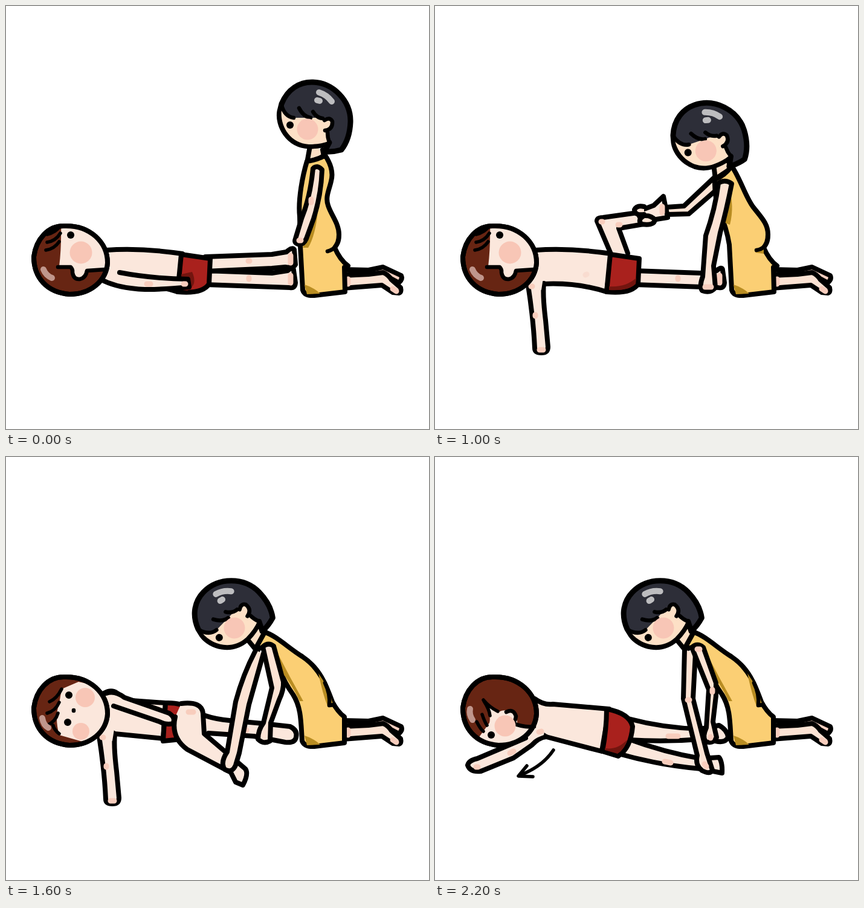
An HTML page for the animation above (3.2 s loop, 700 by 700 pixels).

```html
<!DOCTYPE html>
<html lang="en">
<head>
<meta charset="utf-8">
<title>Rolling over</title>
<style>
html, body { margin: 0; width: 100%; height: 100%; overflow: hidden; background: #fff; }
svg { display: block; width: 100%; height: 100%; }
path, ellipse { stroke: #000; stroke-width: 8; stroke-linecap: round; stroke-linejoin: round; }
.skin { fill: #fbe7dc; }
.her { fill: #fde0c6; }
.limb { fill: #fce3d4; }
.red { fill: #a9211d; }
.maroon { fill: #73150f; stroke: none; }
.dress { fill: #fbcf74; }
.shade { fill: #b98d22; stroke: none; }
.brown { fill: #672513; }
.ink { fill: #2d2e38; stroke-width: 9; }
.line { fill: none; stroke-width: 6.5; }
.lock { fill: none; stroke-width: 5.5; }
.bare { stroke: none; }
.spot { fill: none; stroke: #f8cdbd; stroke-width: 9; }
.blush { fill: #f8c6b6; stroke: none; }
.eye { fill: none; stroke-width: 12; }
.arrow { fill: none; stroke-width: 5.5; }
.shine { fill: none; stroke: #bdbdbf; stroke-width: 10; }
.gloss { fill: none; stroke: #c0968c; stroke-width: 10; }

/* Each pose is shown for one 200 ms step; the last one holds. */
.pose { visibility: hidden; animation: step 3.2s calc((var(--t) - 3200) * 1ms) step-end infinite; }
.hold { animation-name: hold; }
@keyframes step { 0% { visibility: visible } 6.25%, 100% { visibility: hidden } }
@keyframes hold { 0% { visibility: visible } 31.25%, 100% { visibility: hidden } }
</style>
</head>
<body>
<svg viewBox="0 0 700 700">
<defs>
  <!-- Man: heads -->
  <path id="skull" d="M95 364C140 362 168 392 168 425C166 455 140 477 105 477C68 474 46 450 46 415C50 385 70 364 95 364Z"/>
  <clipPath id="inHead"><use href="#skull"/></clipPath>
  <path id="bangs" class="lock" d="M89 365Q82 375 68 378M90 376Q82 389 68 391M88 390Q80 402 66 404"/>
  <g id="headSide">
    <use href="#skull" class="brown"/>
    <path class="skin bare" clip-path="url(#inHead)" d="M91 355H180V435H137Q134 453 120 452Q108 450 108 432L88 431Q92 400 91 355Z"/>
    <use href="#bangs"/>
    <path class="line" d="M86 432H107Q111 436 110 441Q112 453 122 452Q132 450 134 438L164 436"/>
    <path class="gloss" d="M62 436Q66 446 76 450"/>
    <circle class="blush" cx="124" cy="408" r="18.5"/>
    <path class="eye" d="M107 379h.1"/>
    <use href="#skull" fill="none"/>
  </g>
  <g id="headTurned">
    <use href="#skull" class="brown"/>
    <path class="skin bare" clip-path="url(#inHead)" d="M91 355H180V455L132 461Q112 464 106 452L80 445Q82 420 88 405Q92 390 91 355Z"/>
    <use href="#bangs"/>
    <path class="lock" d="M87 402Q80 414 66 418M84 417Q78 428 66 432M82 432Q78 442 67 448"/>
    <path class="line" d="M80 446Q100 449 105 457Q113 466 130 459"/>
    <path class="gloss" d="M61 437L64 441"/>
    <circle class="blush" cx="122" cy="434" r="19.5"/>
    <ellipse class="blush" cx="125" cy="375" rx="9" ry="5"/>
    <path class="eye" d="M106 371h.1M104 408h.1"/>
    <path class="line" d="M113 386h2"/>
    <use href="#skull" fill="none"/>
  </g>
  <g id="headFront">
    <use href="#skull" class="brown"/>
    <path class="skin bare" clip-path="url(#inHead)" d="M88 460Q80 430 88 408L92 384L120 372L180 385V470L130 472Z"/>
    <path class="lock" d="M92 384Q84 400 72 405M88 406Q82 420 68 424M86 424Q82 438 68 444M88 458Q80 452 78 444"/>
    <path class="gloss" d="M60 432Q62 444 70 448"/>
    <circle class="blush" cx="131" cy="398" r="16"/>
    <circle class="blush" cx="124" cy="454" r="14"/>
    <path class="eye" d="M104 394h.1M102 439h.1"/>
    <path class="line" d="M112 419v1"/>
    <use href="#skull" fill="none"/>
  </g>
  <g id="headDown">
    <use href="#skull" class="brown"/>
    <path class="skin bare" clip-path="url(#inHead)" d="M84 485Q92 450 87 428L92 406L112 396Q118 382 131 389Q134 395 134 399L180 402V485Z"/>
    <path class="lock" d="M78 388Q83 400 90 407M73 404Q80 414 82 424M68 418Q80 430 84 440M64 432Q72 446 82 450"/>
    <path class="line" d="M92 406Q104 396 111 396Q117 382 130 389Q134 396 133 399Q148 394 162 402"/>
    <path class="gloss" d="M60 436Q62 446 70 451"/>
    <circle class="blush" cx="135" cy="412" r="19.5"/>
    <ellipse class="blush" cx="121" cy="467" rx="12" ry="5"/>
    <path class="eye" d="M105 417h.1M101 468h.1"/>
    <path class="line" d="M107 451h4"/>
    <use href="#skull" fill="none"/>
  </g>
  <g id="headProne">
    <use href="#skull" class="brown"/>
    <path class="skin bare" clip-path="url(#inHead)" d="M80 402L105 422Q116 416 130 422Q137 434 136 441L170 449V490H62L74 462L90 440Q94 425 80 402Z"/>
    <path class="lock" d="M80 402Q90 414 104 421M81 404Q90 418 91 428M78 426Q82 438 86 444M69 438Q75 450 80 454"/>
    <path class="line" d="M118 422Q130 416 134 429Q133 438 128 440Q146 448 164 446"/>
    <path class="gloss" d="M58 417Q56 426 62 435"/>
    <circle class="blush" cx="116" cy="445" r="17.5"/>
    <path class="eye" d="M93 460h.1"/>
    <use href="#skull" fill="none"/>
  </g>

  <!-- Man: body -->
  <path id="torso" class="skin" d="M150 440L166 404Q225 400 292 410L284 473Q235 457 178 460L150 440"/>
  <g id="standArm">
    <path class="skin" d="M180 459Q178 480 183 520L187 564Q187 574 176 574Q165 574 165 566Q163 520 154 462L140 440"/>
    <path class="skin bare" d="M140 425H183L176 470L158 468Z"/>
    <path class="spot" d="M166 511v2M159 464h2M173 569h6"/>
  </g>
  <path id="shorts" class="red" d="M290 411L338 418L336 460Q325 477 284 473Z"/>
  <path id="shortsHem" class="maroon" d="M288 464Q315 466 333 450L332 460Q320 472 288 470Z"/>
  <g id="lowLeg">
    <path class="skin" d="M330 438L440 442L466 438Q475 430 476 437L479 458Q478 468 470 466L330 461"/>
    <path class="spot" d="M402 450v2M471 446v12"/>
  </g>
  <g id="bothLegs">
    <use href="#lowLeg"/>
    <path class="skin" d="M330 415L440 411L464 407Q474 398 477 403L479 428Q476 434 462 432L440 434L330 439"/>
    <path class="spot" d="M401 422h2M471 413v12"/>
  </g>
  <g id="trunk"><use href="#torso"/><use href="#standArm"/><path class="spot" d="M249 445l2-1" opacity=".4"/></g>
  <g id="crossTrunk">
    <path class="skin" d="M150 440L162 391Q180 380 194 402L264 407L260 466L180 458L150 440"/>
    <use href="#standArm"/>
    <path class="red" d="M264 407Q290 406 304 417L290 467L260 470Z"/>
  </g>
  <path id="restLeg" class="skin" d="M298 412Q325 432 370 436L425 441L470 446Q483 452 480 464Q478 474 462 472L410 462L335 457"/>
  <g id="proneBody">
    <path class="skin" d="M320 433Q380 449 440 450L470 444Q484 452 485 464Q480 474 464 470L440 467Q380 472 320 468"/>
    <path class="skin" d="M318 466Q380 489 440 499L470 497Q476 505 475 523L440 516Q370 510 300 490"/>
    <path class="spot" d="M386 462h16M380 504l10 2"/>
    <path class="skin" d="M150 440L165 400Q180 411 195 409L288 417L276 487L184 463L150 440"/>
    <path class="red" d="M284 417Q322 424 327 446Q324 482 303 495L277 487Q284 450 284 417Z"/>
    <path class="maroon" d="M281 482Q302 485 318 468Q313 484 302 491L281 485Z"/>
  </g>

  <!-- Woman -->
  <g id="shins">
    <path fill="#f6cfc0" d="M558 436L600 437L624 432L654 446Q657 452 650 458L624 444H558"/>
    <path class="limb" d="M558 446L600 444L624 441Q632 444 638 453L653 466Q655 474 650 475L640 474L622 462L558 467"/>
    <path class="spot" d="M566 452v8M640 468l6 4"/>
  </g>
  <path id="hem" class="shade" d="M494 461Q510 466 520 476L498 477Z"/>
  <g id="herHead">
    <path class="ink" d="M-55-20C-45-45-25-56-5-56C30-56 60-25 59 10Q58 38 44 56Q30 60 16 59L24 44Q10 50-10 50C-45 48-62 15-58-8Z"/>
    <path class="her bare" d="M-55-16Q-48 0-36 3H16Q27 1 28 12Q28 24 18 25L22 42Q10 47-10 47C-42 45-58 15-55-10Z"/>
    <path class="line" d="M-55-18Q-50 1-35 3M-26-13Q-19 1-7 3M-3-7Q3 3 13 4M16 7Q25 1 29 9Q30 22 17 24M24 44Q21 36 21 27"/>
    <path class="shine" d="M7-39Q20-35 28-24M4-26l4 1"/>
    <circle class="blush" cx="-12" cy="22" r="17.5"/>
    <path class="eye" d="M-41 15h.1"/>
  </g>
  <g id="upright">
    <use href="#shins"/>
    <path class="her" d="M503 232L498 260H528L524 238"/>
    <path class="dress" d="M498 257Q515 255 528 247C538 262 542 276 538 290C535 304 528 316 533 330C538 346 551 360 551 378C551 390 548 394 544 400C550 414 558 424 566 430L560 432L561 473L510 479Q494 480 491 470L487 397L486 348C483 320 491 280 498 257Z"/>
    <path class="shade" d="M491 400L516 340Q512 380 500 400Z"/>
    <use href="#hem"/>
    <path class="line" d="M551 384Q548 402 532 406"/>
    <use href="#herHead" x="511" y="182"/>
    <path class="limb" d="M508 269Q515 262 523 271C522 300 516 330 509 352L497 385Q492 396 483 394Q476 392 479 385L489 352C500 325 505 300 508 269Z"/>
    <path class="spot" d="M505 320v5M485 388h3"/>
  </g>
  <path id="bentNeck" class="her" d="M479 262V285L506 275L502 258"/>
  <g id="bentNear">
    <path class="dress" d="M478 283Q494 282 509 268C520 285 524 314 533 332C541 348 551 360 551 378C551 390 548 394 544 400C550 414 558 424 566 430L560 432L561 473L510 479Q494 480 491 470L488 397L487 335Q477 310 478 283Z"/>
    <path class="shade" d="M510 298Q522 330 515 355L492 402L502 350Z"/>
    <use href="#hem"/>
    <path class="line" d="M551 384Q548 402 532 406"/>
    <use href="#herHead" transform="translate(470.5 214.5)rotate(-19)"/>
    <path class="limb" d="M492 291Q502 283 513 291Q512 340 500 372L472 430L464 464Q454 472 444 466Q442 456 447 446L456 430L483 365Q491 335 492 291Z"/>
  </g>
  <path id="leanNeck" class="her" d="M461 262L464 286L491 268L485 256"/>
  <g id="leanNear">
    <path class="dress" d="M463 287Q478 282 491 265C505 285 513 314 526 332C540 350 551 360 551 378C551 390 548 394 544 400C550 414 558 424 566 430L560 432L561 473L510 479Q494 480 491 470L487 395Q482 365 472 345Q462 318 463 287Z"/>
    <path class="shade" d="M486 300Q496 330 488 362L478 358Z"/>
    <path class="shade" d="M530 408L544 398L544 410Z"/>
    <use href="#hem"/>
    <path class="line" d="M551 384Q548 402 532 404"/>
    <use href="#herHead" transform="translate(452.5 215)rotate(-19)"/>
    <path class="limb" d="M469 293Q480 286 491 294Q482 340 472 375L461 430L464 466Q456 476 442 471Q437 464 443 448L448 380Q464 335 469 293Z"/>
    <path class="spot" d="M447 465h10"/>
  </g>
  <g id="crouch">
    <path class="dress" d="M437 293L457 270C470 280 480 298 495 312C525 338 548 352 549 378C549 392 546 396 542 402C550 414 558 424 566 430L560 432L561 473L510 479Q494 480 490 470L487 400Q484 380 465 350Z"/>
    <path class="shade" d="M467 302Q482 335 477 360L464 346Z"/>
    <path class="shade" d="M528 408L542 400L546 411Z"/>
    <use href="#hem"/>
    <path class="line" d="M549 382Q546 402 532 404"/>
    <use href="#herHead" transform="translate(406.5 232)rotate(-36)"/>
    <path class="limb" d="M448 297Q458 289 467 299L463 365L440 440L439 471Q430 480 420 472Q418 460 426 447L444 380Z"/>
    <path class="spot" d="M424 467h9"/>
  </g>
  <path id="stoopNeck" class="her" d="M402 305L416 322L430 290L418 278"/>
  <g id="stoop">
    <path class="dress" d="M413 317L428 290C445 294 470 318 490 330C520 350 530 378 540 405Q549 422 560 430V473L510 479Q494 480 490 470C488 440 489 415 475 393Q460 372 454 354L436 314Z"/>
    <path class="shade" d="M449 324Q470 365 492 404L486 404Q472 374 456 356Z"/>
    <path class="shade" d="M517 358Q524 392 532 412L541 408Q532 378 517 358Z"/>
    <use href="#hem"/>
    <path class="line" d="M528 374Q537 392 535 411L543 410"/>
    <use href="#herHead" transform="translate(370.5 259)rotate(-46)"/>
  </g>
  <path id="stoopArm" class="limb" d="M425 314Q434 306 443 313L459 372Q460 385 452 402L438 440L437 470Q426 476 417 467Q417 452 426 440L440 382Z"/>
  <g id="finalWoman">
    <use href="#shins"/><use href="#stoopNeck"/>
    <path class="limb" d="M413 318L411 400L434 494Q430 510 442 519Q456 526 459 518L450 490L427 400L431 325"/>
    <path class="spot" d="M418 402h3M446 508l3 4"/>
    <use href="#stoop"/>
    <path class="limb" d="M425 315Q434 307 444 315L465 374L465 395L460 438L466 464Q460 475 448 471Q442 464 449 448L453 385Z"/>
    <path class="spot" d="M434 318h4M459 385v4M456 463v2"/>
  </g>
</defs>

<g class="pose" style="--t:0">
  <use href="#bothLegs"/><use href="#torso"/><use href="#shorts"/>
  <path class="maroon" d="M290 444L308 440Q318 462 300 471L292 470Z"/>
  <path class="skin bare" d="M155 440H190L288 451L300 466L215 468L160 455Z"/>
  <path class="skin" d="M188 441Q240 451 301 452L303 465Q240 471 215 468Q180 465 156 452"/>
  <path class="spot" d="M233 460h6M294 460h3"/>
  <use href="#headSide"/><use href="#upright"/>
</g>

<g class="pose" style="--t:200">
  <use href="#bothLegs"/><use href="#torso"/><use href="#shorts"/><use href="#shortsHem"/>
  <path class="skin" d="M192 438L284 515Q290 526 282 533Q274 538 266 531L155 456"/>
  <path class="spot" d="M226 488l4 3M274 525l3 2"/>
  <use href="#headSide"/><use href="#upright"/>
</g>

<g class="pose" style="--t:400">
  <use href="#bothLegs"/><use href="#trunk"/><use href="#shorts"/><use href="#shortsHem"/>
  <use href="#headSide"/><use href="#upright"/>
</g>

<g class="pose" style="--t:600">
  <use href="#lowLeg"/><use href="#trunk"/>
  <path class="skin" d="M308 405L352 368Q358 365 370 367L436 371L464 359Q470 374 462 386L440 393L380 391L325 424"/>
  <path class="spot" d="M354 374l6-1M459 370v8"/>
  <path class="red" d="M290 411L317 398L338 430L336 460Q325 477 284 473Z"/>
  <use href="#shortsHem"/><use href="#headSide"/>
  <use href="#shins"/><use href="#bentNeck"/>
  <path class="limb" d="M484 327L444 360Q430 366 430 378Q434 386 440 380L487 346"/>
  <ellipse class="limb" cx="441" cy="391" rx="9" ry="6"/>
  <use href="#bentNear"/>
</g>

<g class="pose" style="--t:800">
  <use href="#lowLeg"/><use href="#trunk"/>
  <path class="skin" d="M293 410L304 358Q308 349 320 350L396 350L418 333Q426 350 424 368L396 374L344 378L328 416"/>
  <path class="spot" d="M312 358h5M418 348v10"/>
  <use href="#shorts"/><use href="#shortsHem"/><use href="#headSide"/>
  <use href="#shins"/><use href="#bentNeck"/>
  <path class="limb" d="M484 325L440 351L396 349Q384 354 388 364Q394 368 402 362L444 368L487 346"/>
  <ellipse class="limb" cx="402" cy="371" rx="10" ry="7"/>
  <use href="#bentNear"/>
</g>

<g class="pose" style="--t:1000">
  <use href="#lowLeg"/><use href="#trunk"/>
  <path class="skin" d="M291 410L268 356Q268 350 278 350L335 342L345 361L304 368L319 409"/>
  <path class="spot" d="M275 357h2M303 362h3"/>
  <use href="#shorts"/><use href="#shortsHem"/><use href="#headSide"/>
  <use href="#shins"/><use href="#leanNeck"/>
  <path class="limb" d="M464 282L412 331L382 333L384 345L420 344L466 304"/>
  <path class="skin" d="M338 339L362 330L378 315L381 330L385 350L360 354"/>
  <path class="limb" d="M346 345Q330 347 330 337Q334 329 346 332M346 347Q334 354 342 361Q362 364 364 354Q358 346 346 347"/>
  <path class="spot" d="M376 332v10"/>
  <use href="#leanNear"/>
</g>

<g class="pose" style="--t:1200">
  <use href="#lowLeg"/><use href="#trunk"/>
  <path class="skin" d="M290 412L238 372Q230 362 242 354L314 334L326 352L278 368L319 408"/>
  <path class="spot" d="M244 364h4"/>
  <use href="#shorts"/><use href="#shortsHem"/><use href="#headSide"/>
  <use href="#shins"/><use href="#leanNeck"/>
  <path class="limb" d="M464 282L404 326L362 329V342L412 342L466 304"/>
  <path class="skin" d="M318 334L342 325L357 310L360 326L364 345L340 349"/>
  <path class="limb" d="M326 340Q310 342 310 332Q314 324 326 327M326 342Q314 349 322 356Q342 359 344 349Q338 341 326 342"/>
  <use href="#leanNear"/>
</g>

<g class="pose" style="--t:1400">
  <path class="skin" d="M310 428L370 438L425 443L470 448Q482 452 480 464Q478 474 464 471L410 466L310 460"/>
  <path class="spot" d="M390 455h8M464 462h4"/>
  <use href="#standArm"/>
  <path class="skin bare" d="M150 392L185 403L272 404L285 470L178 459L150 450Z"/>
  <path fill="none" d="M184 403L270 404M180 459Q235 460 285 471"/>
  <path class="skin" d="M160 394L250 354L274 342Q286 342 284 353Q278 362 260 368L184 403"/>
  <path class="spot" d="M231 380l5-2M268 353l6-2"/>
  <path fill="#73150f" d="M300 447L318 432L320 456L306 458Z"/>
  <path class="skin" d="M270 404C284 386 322 386 322 410Q320 434 297 449L346 482L377 506Q380 512 369 525L360 521L352 506L284 470C260 463 258 425 270 404Z"/>
  <path fill="none" d="M297 449Q282 446 274 436"/>
  <path class="spot" d="M314 412Q312 426 302 436M367 510l2 3"/>
  <path class="arrow" d="M296 364Q276 370 262 391M261 378L260 395L276 391"/>
  <use href="#headTurned"/>
  <use href="#shins"/>
  <path class="her" d="M431 284L438 296L458 272L450 262"/>
  <path class="limb" d="M437 297L392 385L340 480Q328 490 331 502Q344 512 352 501L358 480L414 386L444 312"/>
  <path class="spot" d="M403 390l3 2M340 500h4"/>
  <use href="#crouch"/>
</g>

<g class="pose" style="--t:1600">
  <use href="#restLeg"/><use href="#crossTrunk"/>
  <path class="skin" d="M290 408Q324 404 326 424L328 458L396 516Q402 524 392 543L380 538L372 522L300 484Q272 464 280 430"/>
  <path class="spot" d="M390 452h8M302 422h8"/>
  <path class="skin" d="M166 391Q180 386 196 398L270 424Q282 432 276 441Q266 444 254 438L178 412"/>
  <use href="#headFront"/>
  <use href="#shins"/><use href="#stoopNeck"/>
  <path class="limb" d="M413 320Q392 360 380 405L366 488Q354 506 362 517Q374 524 380 510L386 490L402 410L426 325"/>
  <use href="#stoop"/><use href="#stoopArm"/>
</g>

<g class="pose" style="--t:1800">
  <use href="#restLeg"/><use href="#crossTrunk"/>
  <path class="skin" d="M300 420Q322 442 330 462L345 486L425 540Q434 546 419 571L408 558L384 542L336 508Q312 486 292 463"/>
  <path class="spot" d="M384 450h8M332 496l8 4M326 440h6M188 445l8 4M422 548l-2 8"/>
  <path class="skin" d="M166 390Q182 381 194 401L226 472L247 508Q250 516 240 517Q228 512 218 497L172 399"/>
  <path class="spot" d="M236 506l3 3"/>
  <path class="arrow" d="M305 524Q320 538 342 550M330 541L344 552L326 549"/>
  <use href="#headDown"/>
  <use href="#shins"/><use href="#stoopNeck"/>
  <path class="limb" d="M413 320Q390 365 381 417L387 530Q380 544 390 554Q402 560 408 546L402 520L398 418L428 330"/>
  <path class="spot" d="M414 330l4 2M394 548h4"/>
  <use href="#stoop"/><use href="#stoopArm"/>
  <path class="spot" d="M429 461v4"/>
</g>

<g class="pose" style="--t:2000">
  <use href="#proneBody"/>
  <path class="skin" d="M184 463L112 554Q104 568 94 566Q84 562 89 548L150 465L140 440"/>
  <path class="skin bare" d="M150 430L184 440L180 460L160 468Z"/>
  <path class="spot" d="M98 556l2-2"/>
  <use href="#headProne"/><use href="#finalWoman"/>
</g>

<g class="pose hold" style="--t:2200">
  <use href="#proneBody"/>
  <path class="skin" d="M184 463Q172 464 160 477L130 498L76 520Q58 522 54 510Q56 502 70 499L150 465L140 440"/>
  <path class="skin bare" d="M150 430L184 440L180 460L160 468Z"/>
  <path class="spot" d="M68 513h3M124 490l6-3M172 455l4-1"/>
  <path class="arrow" d="M196 485Q178 512 142 526M152 511L138 528L162 529"/>
  <use href="#headProne"/><use href="#finalWoman"/>
</g>
</svg>
</body>
</html>
```
